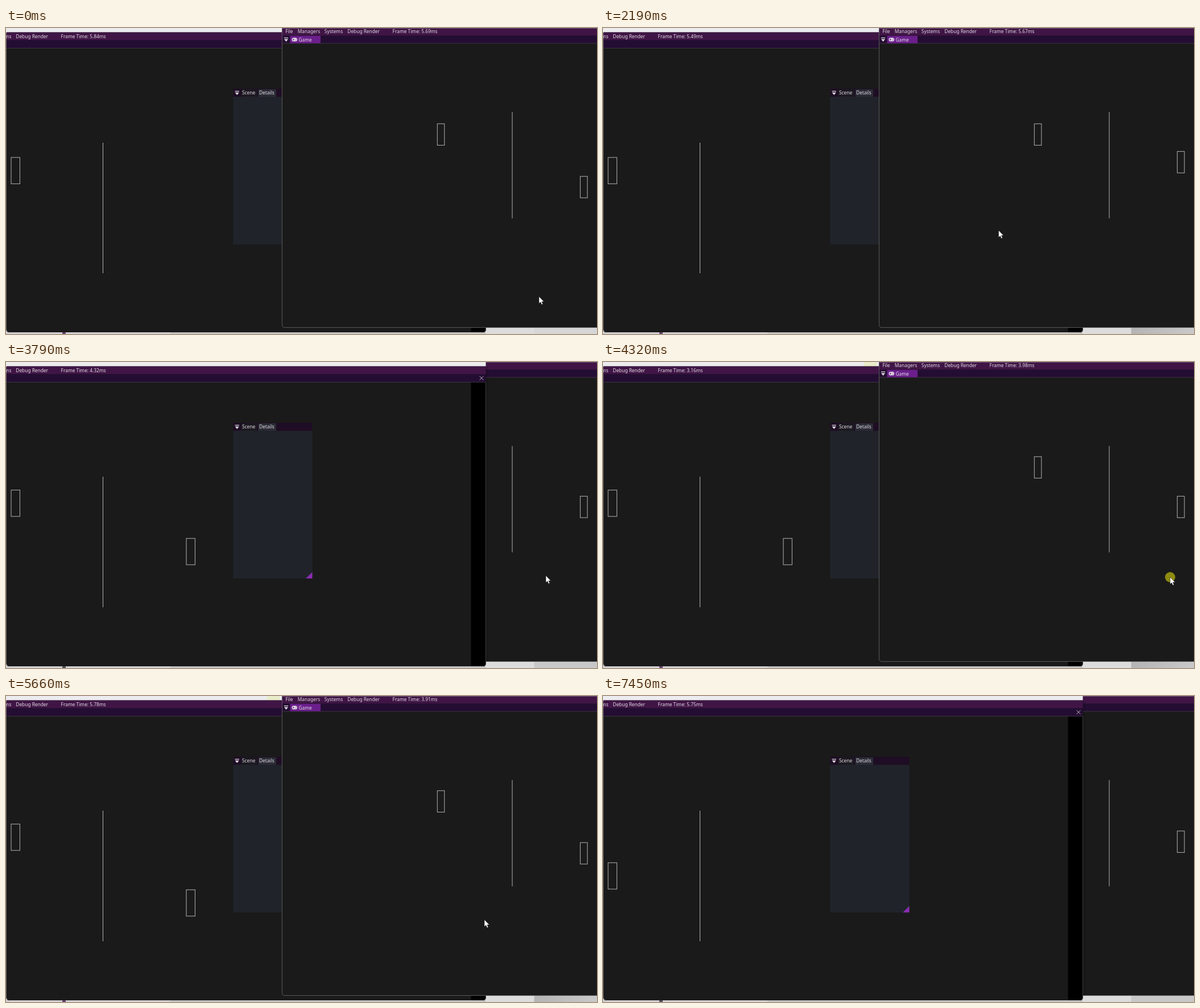
Recreate the animation shown at these times as an HTML page. Size 1039 px wide and 539 px high, loop 7.52 s.

```html
<!DOCTYPE html>
<html lang="en">
<head>
<meta charset="utf-8">
<title>Two game windows</title>
<style>
  html, body { margin: 0; width: 100%; height: 100%; overflow: hidden; background: #dcdcdc; }
  svg { display: block; width: 100vw; height: 100vh; }
  text { font: 8.35px "Noto Sans", "Open Sans", sans-serif; fill: #e0dae2; white-space: pre; }
  .wire { fill: none; stroke: #b2b2b2; stroke-width: 1; }
</style>
</head>
<body>
<svg viewBox="0 0 1039 539" preserveAspectRatio="none">
  <defs>
    <linearGradient id="fade">
      <stop offset="0" stop-color="#000" stop-opacity=".2"/>
      <stop offset="1" stop-color="#000" stop-opacity="0"/>
    </linearGradient>
    <linearGradient id="dusk">
      <stop offset="0" stop-color="#b4b4b4"/>
      <stop offset="1" stop-color="#c9c9c9"/>
    </linearGradient>
    <clipPath id="leftClip"><path d="M1 7.5H843.5V531Q843.5 536 838.5 536H6Q1 536 1 531Z"/></clipPath>
    <clipPath id="rightClip"><path d="M485 0H1039V528H490Q485 528 485 523Z"/></clipPath>
    <g id="menuIcon" fill="#e0dae2"><path d="M-3.7-3.6H3.7V-2.3H-3.7ZM-3.7-.9H3.7L0 3.7Z"/></g>
  </defs>

  <rect width="1039" height="539" fill="#dedede"/>
  <rect y="536" width="289" height="3" fill="#d3d0d3"/>
  <rect x="289" y="536" width="555" height="3" fill="#c4c4c4"/>
  <rect id="spot" x="99" y="536" width="6" height="3"/>
  <rect x="843" y="528" width="85" height="11" fill="#dcdcdc"/>
  <rect id="corner" x="928.5" y="528" width="111" height="11"/>

  <g id="stack">
    <g id="left">
      <rect width="843.5" height="8" fill="#ececf0"/>
      <rect id="note" x="459" width="22" height="8" fill="#e9ebc9"/>
      <rect id="leftShade" x="843" y="8" width="7" height="520" fill="url(#fade)"/>
      <g clip-path="url(#leftClip)">
        <rect y="7" width="844" height="530" fill="#1a1a1a"/>
        <rect y="7.5" width="844" height="14" fill="#401546"/>
        <rect y="21.5" width="844" height="14" fill="#240d32"/>
        <rect y="35" width="844" height="1" fill="#3c3342"/>
        <rect x="817.5" y="36" width="27" height="501" fill="#000"/>
        <text x="9.4" y="17.6" text-anchor="end">Systems</text>
        <text x="17.3" y="17.6">Debug Render</text>
        <text id="leftMs" x="96.6" y="17.6"></text>
        <path d="M832.7 25.2L839.3 31.8M839.3 25.2L832.7 31.8" stroke="#d5cdd8" stroke-width=".9"/>
        <path class="wire" d="M170.5 202V432"/>
        <rect id="leftOwn" class="wire" x="9" width="15.4" height="46.4"/>
        <rect id="leftPeer" class="wire" x="317" width="15.4" height="46.4"/>
        <rect x="399.5" y="107" width="139" height="274.3" fill="#20242a"/>
        <rect x="399.5" y="107" width="139" height="14.2" fill="#1e0d24"/>
        <rect x="413.5" y="108" width="28" height="13.2" fill="#1d1a22"/>
        <rect x="443.5" y="108" width="31.5" height="13.2" fill="#2b2c35"/>
        <use href="#menuIcon" x="406.2" y="114.4"/>
        <text x="415" y="117.4">Scene</text>
        <text x="445" y="117.4">Details</text>
        <path d="M538.5 370V381.3H527.2Z" fill="#8c2cb4"/>
      </g>
      <path d="M.5 8V531Q.5 536 5.5 536M843.5 36V531Q843.5 536 838.5 536" fill="none" stroke="#4d4d4d" stroke-width=".8"/>
    </g>
    <g id="right">
      <g clip-path="url(#rightClip)">
        <rect x="485" width="554" height="528" fill="#1a1a1a"/>
        <rect x="485" width="554" height="13.5" fill="#401546"/>
        <rect x="485" y="13.5" width="554" height="13.5" fill="#240d32"/>
        <rect x="485" y="26.6" width="554" height="1" fill="#3c3342"/>
        <rect x="499.5" y="13.8" width="53.5" height="13" fill="#6b1f8c"/>
        <rect x="485" width="554" height=".8" fill="#77677a"/>
        <text x="491.2" y="9.2">File</text>
        <text x="512.8" y="9.2">Managers</text>
        <text x="559.8" y="9.2">Systems</text>
        <text x="600.3" y="9.2">Debug Render</text>
        <text id="rightMs" x="679.6" y="9.2"></text>
        <use href="#menuIcon" x="492.5" y="20.3"/>
        <rect x="502.5" y="17.2" width="9.6" height="6.4" rx="3.1" fill="#e0dae2"/>
        <path d="M503.8 20.4H506.8M505.3 18.9V21.9M509 21.4H510M510.1 19.4H511" stroke="#6b1f8c" stroke-width=".9"/>
        <text x="514.5" y="23.6">Game</text>
        <path class="wire" d="M890 148V335.3"/>
        <rect id="rightPeer" class="wire" x="758.3" width="12.5" height="37.8"/>
        <rect id="rightOwn" class="wire" x="1009.6" width="12.5" height="37.8"/>
      </g>
      <path d="M485.4 1V522.6Q485.4 527.6 490.4 527.6H1039" fill="none" stroke="#646464" stroke-width=".9"/>
    </g>
  </g>

  <circle id="click" r="9" fill="#8d8a10"/>
  <path id="cursor" d="M0 0V12.3L2.8 9.8 4.7 14.2 6.8 13.3 4.9 9.1H8.7Z" fill="#fff" stroke="#111" stroke-width=".5"/>
</svg>
<script>
const LOOP = 7520, TICK = 67;
const CLICKS = [2640, 4250, 5960]; // each click brings the other window forward
const el = {};
document.querySelectorAll('[id]').forEach(n => el[n.id] = n);

const clamp = v => Math.min(1, Math.max(0, v));
const linear = p => p;
const smooth = p => p * p * (3 - 2 * p);

// Moves are [begin, end, target]; the value rests between them.
const track = (from, moves, ease = linear) => t =>
  moves.reduce((v, [a, b, to]) => v + (to - v) * ease(clamp((t - a) / (b - a))), from);

const leftPaddle = track(228, [[2660, 2910, 255.2], [3240, 3700, 225.6], [6440, 7160, 293.7]]);
const rightPaddle = track(261.3, [[780, 1390, 217.4], [2240, 2500, 236.4], [4780, 5150, 261.3], [5600, 6060, 237.8]]);
const cursorX = track(937, [[200, 780, 695.5], [2420, 2680, 338.6], [3240, 3900, 997],
  [4850, 5550, 841], [5680, 6000, 400], [6460, 7000, 886]], smooth);
const cursorY = track(473, [[200, 780, 356.5], [2420, 2680, 341.5], [3240, 3900, 379],
  [4850, 5550, 394], [5680, 6000, 380], [6460, 7000, 518]], smooth);

function noise(n) {
  const v = Math.sin(n * 127.1) * 43758.5453;
  return v - Math.floor(v) - 0.5;
}

// Frame time hovers around 5.7 ms and dips in the middle of the loop.
function label(t, dip, width, seed) {
  const step = Math.floor(t / TICK);
  const ms = 5.7 - 2.5 * Math.exp(-(((t - dip) / width) ** 2)) + noise(step + seed) * 0.6;
  return `Frame Time: ${ms.toFixed(2)}ms`;
}

const show = (node, on) => node.setAttribute('visibility', on ? 'visible' : 'hidden');
const toLeft = y => 202 + (y - 148) * 1.23;
const toRight = y => 148 + (y - 202) / 1.23;

function draw(t) {
  const clicked = CLICKS.filter(c => t >= c).length;
  const leftFront = clicked % 2 === 1;
  const front = leftFront ? el.left : el.right;
  if (el.stack.lastElementChild !== front) el.stack.append(front);
  show(el.leftShade, leftFront);
  show(el.note, clicked === 2);
  el.spot.setAttribute('fill', leftFront ? '#55505a' : '#69456f');
  el.corner.setAttribute('fill', t < 70 ? '#d6d6d6' : leftFront ? '#c8c8c8' : 'url(#dusk)');

  const own = leftPaddle(t);
  el.leftOwn.setAttribute('y', own);
  el.rightPeer.setAttribute('y', toRight(own) - 0.4);
  el.rightOwn.setAttribute('y', rightPaddle(t));
  el.leftPeer.setAttribute('y', toLeft(rightPaddle(t - 60)));
  show(el.leftPeer, clicked > 0 && t < 7350);

  el.leftMs.textContent = label(t, 4400, 800, 3);
  el.rightMs.textContent = label(t, 5000, 1100, 51);

  const place = `translate(${cursorX(t)} ${cursorY(t)})`;
  el.cursor.setAttribute('transform', place);
  el.click.setAttribute('transform', place);
  show(el.cursor, t < 7180);
  show(el.click, CLICKS.some(c => t >= c && t < c + 120));
}

const start = performance.now();
function frame() {
  draw((performance.now() - start) % LOOP);
  requestAnimationFrame(frame);
}
draw(0);
requestAnimationFrame(frame);
</script>
</body>
</html>
```
